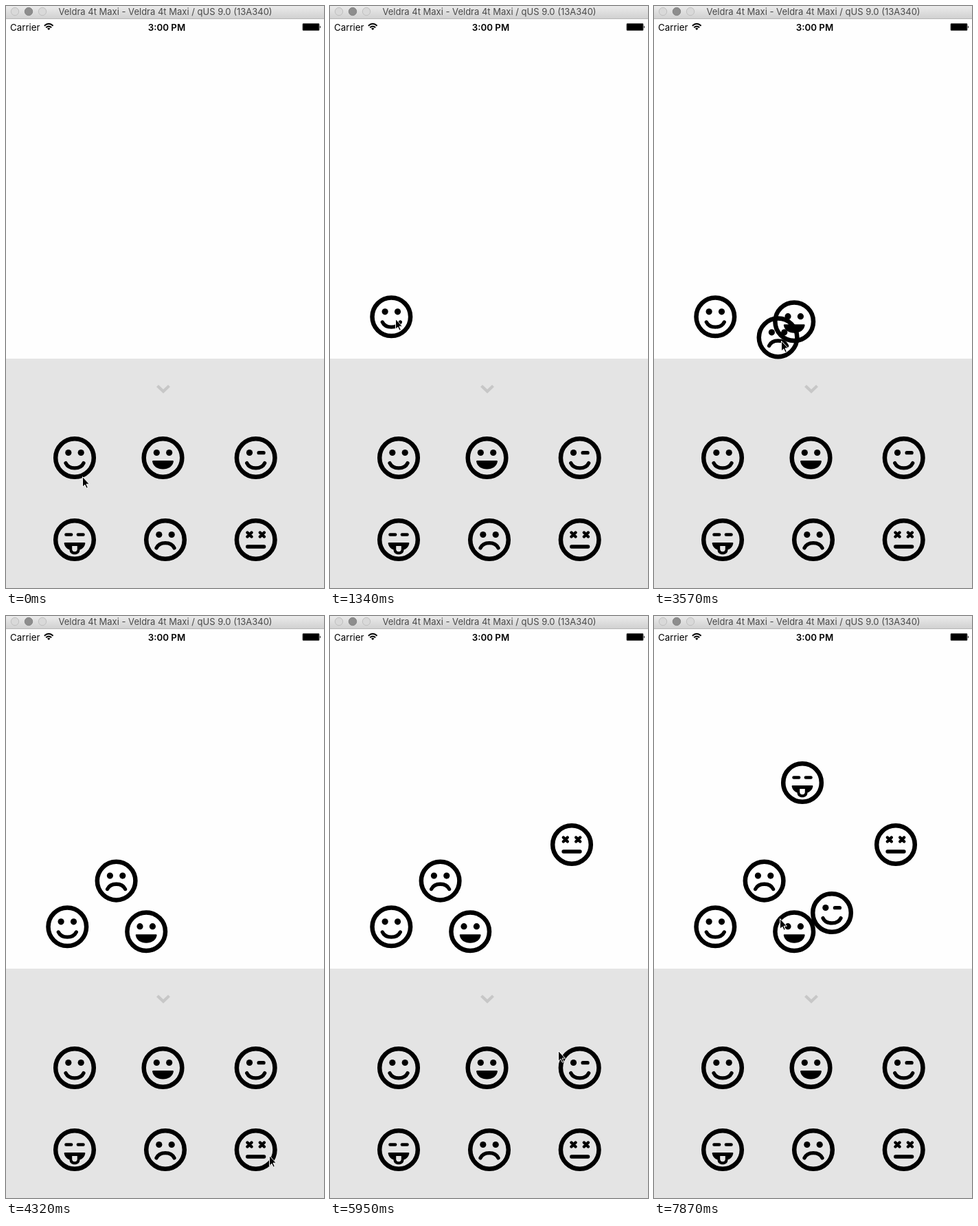
These frames come from a looping animation (463 px wide and 845 px high, 8000 ms). An HTML page:

```html
<!DOCTYPE html>
<html lang="en">
<head>
<meta charset="utf-8">
<title>Drag the faces</title>
<style>
  html, body { margin: 0; width: 100%; height: 100%; overflow: hidden; background: #fefefe; }
  svg { display: block; width: 100%; height: 100%; }
  .line { fill: none; stroke: #000; stroke-width: 5.3; stroke-linecap: round; }
  .thin { stroke-width: 4.4; }
  .title { font: 13px Inter, sans-serif; fill: #484848; text-anchor: middle; }
  .status { font: 13.3px Inter, sans-serif; }
  .clock { font-weight: 600; text-anchor: middle; }
</style>
</head>
<body>
<svg viewBox="0 0 463 845">
  <defs>
    <linearGradient id="bar" x2="0" y2="1">
      <stop stop-color="#ebebeb"/><stop offset="1" stop-color="#d1d1d1"/>
    </linearGradient>
    <circle id="ring" r="27.8" fill="none" stroke="#000" stroke-width="6.5"/>
    <circle id="eye" cy="-7.5" r="4.6"/>
    <g id="eyes"><use href="#eye" x="-9.2"/><use href="#eye" x="9.2"/></g>
    <path id="curve" class="line" d="M-13 7.6C-8.5 17.3 8.5 17.3 13 7.6"/>

    <g id="smile"><use href="#ring"/><use href="#eyes"/><use href="#curve"/></g>
    <g id="grin">
      <use href="#ring"/><use href="#eyes"/>
      <path d="M-14.5 4H14.5Q15.6 4 15.4 5.5C14 12.5 8 16.5 0 16.5S-14 12.5-15.4 5.5Q-15.6 4-14.5 4Z"/>
    </g>
    <g id="wink">
      <use href="#ring"/><use href="#eye" x="-9.2"/><use href="#curve"/>
      <path class="line" d="M4.4 -7.3H11.4"/>
    </g>
    <g id="tongue">
      <use href="#ring"/>
      <path class="line thin" d="M-12.6 -7.5H-4.8M4.8 -7.5H12.6"/>
      <path fill-rule="evenodd" d="M-14.5 4H14.5Q15.6 4 15.3 5.7C14.4 10 11.5 13 7.5 14.5C7.3 19 4.5 21.3 0 21.3S-7.3 19-7.5 14.5C-11.5 13-14.4 10-15.3 5.7Q-15.6 4-14.5 4ZM-3.8 9V13.5Q-3.8 17.2 0 17.2T3.8 13.5V9Z"/>
    </g>
    <g id="sad"><use href="#ring"/><use href="#eyes"/><use href="#curve" transform="translate(0 19.5) scale(1 -1)"/></g>
    <g id="dead">
      <use href="#ring"/>
      <path class="line thin" d="M-12.2 -10.5l6 6m0 -6l-6 6M6.2 -10.5l6 6m0 -6l-6 6"/>
      <path class="line" d="M-12 10H12"/>
    </g>
  </defs>

  <rect width="463" height="845" fill="#fefefe"/>
  <rect width="463" height="18" fill="url(#bar)"/>
  <path d="M0 18.5H463" stroke="#b5b5b5"/>
  <g fill="#d9d9d9" stroke="#c0c0c0">
    <circle cx="13" cy="8" r="5.7"/>
    <circle cx="33" cy="8" r="5.7" fill="#8d8d8d" stroke="#848484"/>
    <circle cx="53" cy="8" r="5.7"/>
  </g>
  <text class="title" x="232" y="13">Veldra 4t Maxi - Veldra 4t Maxi / qUS 9.0 (13A340)</text>
  <text class="status" x="6" y="35.5">Carrier</text>
  <text class="status clock" x="234" y="35.5">3:00 PM</text>
  <g fill="none" stroke="#000" stroke-width="1.9">
    <path d="M55.8 28.7Q62.2 23 68.6 28.7M58.2 31.3Q62.2 27.7 66.2 31.3"/>
    <path d="M60 32.7Q62.2 31 64.4 32.7L62.2 35Z" fill="#000" stroke="none"/>
  </g>
  <rect x="432" y="25.5" width="24" height="10" rx="1" stroke="#555"/>
  <path d="M457 28.5Q459 30.5 457 32.5Z"/>

  <rect y="512" width="463" height="333" fill="#e4e4e4"/>
  <path d="M220.5 551.5L229 559.5L237.5 551.5" fill="none" stroke="#c7c7c7" stroke-width="4.2"/>
  <use href="#smile" x="100" y="656"/>
  <use href="#grin" x="228.5" y="656"/>
  <use href="#wink" x="363.7" y="656"/>
  <use href="#tongue" x="100" y="775"/>
  <use href="#sad" x="232" y="775"/>
  <use href="#dead" x="363.7" y="775"/>

  <g id="copies"></g>
  <path id="cursor" d="M.5 .5V15.2L3.8 12.2L6.2 17.2L8.4 16.2L6 11.2H10.4Z" stroke="#fff"/>
</svg>
<script>
const LOOP = 8000, STEP = 148.4;

// Where the pointer stops, in steps; a stop with a face is a drop, with the copy's centre.
const stops = [
  { x: 111, y: 683, arrive: 0, leave: 0 },
  { x: 104, y: 671, arrive: 2, leave: 4 },
  { x: 95, y: 454, arrive: 8, leave: 9, face: 'smile', centre: [89.3, 451.3] },
  { x: 214, y: 670, arrive: 12, leave: 12 },
  { x: 208, y: 464, arrive: 15, leave: 16, face: 'grin', centre: [204.2, 458.2] },
  { x: 243, y: 767, arrive: 20, leave: 21 },
  { x: 165, y: 389, arrive: 26, leave: 27, face: 'sad', centre: [160.6, 384.6] },
  { x: 383, y: 783, arrive: 29, leave: 31 },
  { x: 360, y: 337, arrive: 35, leave: 35, face: 'dead', centre: [352, 332] },
  { x: 346, y: 665, arrive: 39, leave: 39 },
  { x: 252, y: 435, arrive: 42, leave: 42, face: 'wink', centre: [259, 431] },
  { x: 108, y: 780, arrive: 47, leave: 48 },
  { x: 42, y: 524, arrive: 49, leave: 49 },
  { x: 222, y: 247, arrive: 52, leave: 52, face: 'tongue', centre: [216, 242] },
  { x: 183, y: 439, arrive: 53, leave: 53 }
];

const easeOut = u => 1 - (1 - u) ** 2;
const easeInOut = u => u < 0.5 ? 4 * u ** 3 : 1 - 4 * (1 - u) ** 3;
const mix = (a, b, u) => a + (b - a) * u;
const place = (el, x, y) => el.setAttribute('transform', `translate(${x} ${y})`);

function pointerAt(step) {
  const i = stops.findLastIndex(s => s.arrive <= step);
  const from = stops[i], to = stops[i + 1];
  if (!to || step <= from.leave) return [from.x, from.y];
  const ease = to.face ? easeInOut : easeOut;
  const u = ease((step - from.leave) / (to.arrive - from.leave));
  return [mix(from.x, to.x, u), mix(from.y, to.y, u)];
}

const cursor = document.getElementById('cursor');
const copies = document.getElementById('copies');

const drags = stops.flatMap((drop, i) => {
  if (!drop.face) return [];
  const el = document.createElementNS('http://www.w3.org/2000/svg', 'use');
  el.setAttribute('href', '#' + drop.face);
  copies.append(el);
  return [{ el, drop, pressed: stops[i - 1].leave }];
});

function render(time) {
  const step = Math.floor((time % LOOP) / STEP);
  place(cursor, ...pointerAt(step));
  for (const { el, drop, pressed } of drags) {
    // The copy shows up one step after the pointer starts to pull.
    el.style.display = step > pressed + 1 ? '' : 'none';
    const [x, y] = pointerAt(Math.min(step, drop.arrive));
    place(el, drop.centre[0] + x - drop.x, drop.centre[1] + y - drop.y);
  }
}

const began = performance.now();
function tick() {
  render(performance.now() - began);
  requestAnimationFrame(tick);
}
tick();
</script>
</body>
</html>
```
